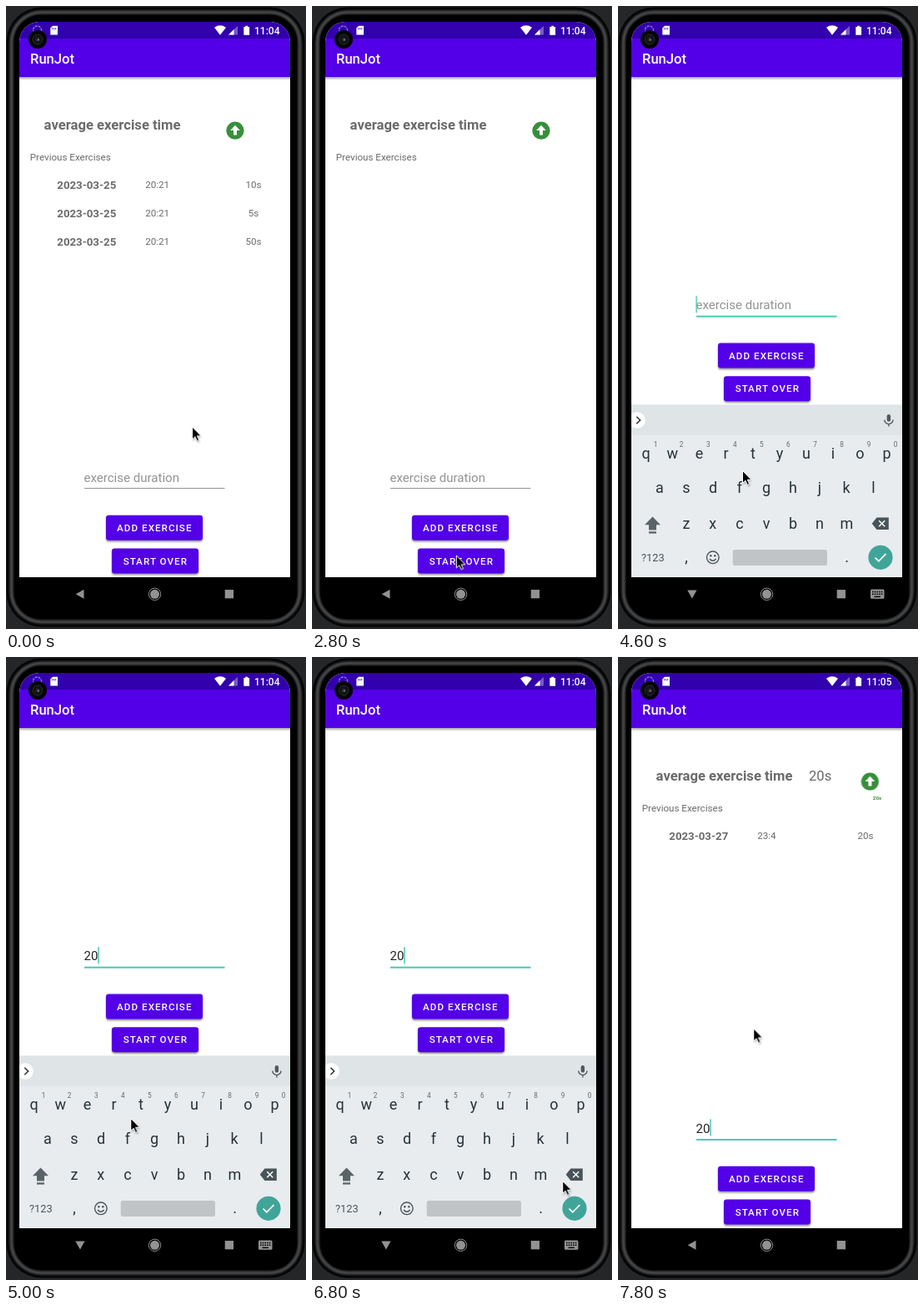
Recreate the animation shown at these times as an HTML page. Size 360x746 px, loop 8000 ms.

```html
<!DOCTYPE html>
<html lang="en">
<head>
<meta charset="utf-8">
<title>RunJot</title>
<style>
html, body { margin: 0; width: 100%; height: 100%; overflow: hidden; background: #242628; }
svg { display: block; width: 360px; height: 746px; }
text { font-family: Roboto, sans-serif; font-size: 11.62px; fill: #6a6a6a; }
.mid { text-anchor: middle; }
.big { font-size: 16.64px; }
.bold { font-weight: 700; }
.date { font-size: 13.23px; font-weight: 700; }
.field { font-size: 15.05px; }
.label { font-weight: 500; fill: #fff; letter-spacing: .0893em; text-anchor: middle; }
.bar { font-weight: 500; fill: #fff; }
.clock { font-size: 12px; }
.typed { fill: #222; }
.key { font-size: 18px; fill: #263238; text-anchor: middle; }
.sup { font-size: 8.2px; fill: #61686c; text-anchor: middle; }

/* one shared clock; every change is a hard step */
.a { animation: 8s step-end -40ms infinite both; }
.cursor { animation-name: cursor; }
.content { animation-name: pan; }
.board { animation-name: board; }
.old { animation-name: old; }
.new { animation-name: new; }
.before { animation-name: before; }
.idle { animation-name: idle; }
.focus { animation-name: focus; }
.hint { animation-name: hint; }
.two { animation-name: two; }
.zero { animation-name: zero; }
.caret { animation-name: blink, caret; }
.back { animation-name: back; }
.down { animation-name: down; }
.badge { animation-name: badge; }
.clear { animation-name: clear; }
.wave { animation-name: wave; }
.flash { animation-name: flash; }
.lift { animation-name: lift; }

@keyframes cursor {
  0% { transform: translate(223px, 503.5px); }
  2.5% { transform: translate(221px, 515px); }
  5% { transform: translate(211px, 551px); }
  7.5% { transform: translate(196px, 597px); }
  10% { transform: translate(184px, 634px); }
  12.5% { transform: translate(176px, 653px); }
  15% { transform: translate(172.8px, 657.5px); }
  37.5% { transform: translate(163px, 609px); }
  40% { transform: translate(149px, 559px); }
  45% { transform: translate(148.2px, 560px); }
  55% { transform: translate(149px, 556px); }
  60% { transform: translate(149.2px, 552px); }
  65% { transform: translate(151px, 543px); }
  67.5% { transform: translate(159px, 506px); }
  70% { transform: translate(172px, 460px); }
  72.5% { transform: translate(182px, 432px); }
  75% { transform: translate(183px, 429.5px); }
  80% { transform: translate(205px, 470px); }
  82.5% { transform: translate(258px, 560px); }
  85% { transform: translate(300.2px, 627px); }
  87.5% { transform: translate(311px, 654px); }
  90%, 92.5% { transform: translate(312px, 657px); }
  95% { transform: translate(238px, 548px); }
  97.5%, 100% { transform: translate(162.2px, 444.5px); }
}
@keyframes pan {
  0% { transform: none; }
  55% { transform: translateY(-206.3px); }
  95%, 100% { transform: none; }
}
@keyframes board {
  0% { transform: translateY(210px); }
  52.5% { transform: translateY(105px); }
  55% { transform: none; }
  92.5% { transform: translateY(120px); }
  95%, 100% { transform: translateY(210px); }
}
@keyframes old { 0% { visibility: visible; } 22.5%, 100% { visibility: hidden; } }
@keyframes new { 0% { visibility: hidden; } 95%, 100% { visibility: visible; } }
@keyframes before { 0% { visibility: visible; } 95%, 100% { visibility: hidden; } }
@keyframes idle { 0% { visibility: visible; } 50%, 100% { visibility: hidden; } }
@keyframes focus { 0% { visibility: hidden; } 50%, 100% { visibility: visible; } }
@keyframes hint { 0% { visibility: visible; } 60%, 100% { visibility: hidden; } }
@keyframes two { 0% { visibility: hidden; } 60%, 100% { visibility: visible; } }
@keyframes zero { 0% { visibility: hidden; } 62.5%, 100% { visibility: visible; } }
@keyframes blink {
  0%, 65%, 77.5%, 90% { visibility: hidden; }
  55%, 72.5%, 85%, 97.5%, 100% { visibility: visible; }
}
@keyframes caret {
  0% { transform: translateX(-16.8px); }
  60% { transform: translateX(-8.4px); }
  62.5%, 100% { transform: none; }
}
@keyframes back { 0%, 92.5%, 100% { visibility: visible; } 52.5% { visibility: hidden; } }
@keyframes down { 0%, 92.5%, 100% { visibility: hidden; } 52.5% { visibility: visible; } }
@keyframes badge { 0% { transform: none; } 95%, 100% { transform: translateX(27.4px); } }
@keyframes clear {
  0% { opacity: 0; }
  22.5% { opacity: .35; }
  25% { opacity: .3; }
  27.5% { opacity: .22; }
  30% { opacity: .13; }
  32.5% { opacity: .05; }
  35%, 100% { opacity: 0; }
}
@keyframes wave { 0%, 77.5%, 100% { opacity: 0; } 75% { opacity: .13; } }
@keyframes flash {
  0% { opacity: 0; }
  75% { opacity: .07; }
  77.5% { opacity: .28; }
  80% { opacity: .14; }
  82.5%, 100% { opacity: 0; }
}
@keyframes lift { 0%, 82.5%, 100% { opacity: 0; } 75% { opacity: .4; } 80% { opacity: .2; } }
</style>
</head>
<body>
<svg viewBox="0 0 360 746" width="360" height="746">
  <defs>
    <clipPath id="screen"><path d="M16 684V43a24 24 0 0 1 24-24H317a24 24 0 0 1 24 24V684z"/></clipPath>
    <clipPath id="page"><path d="M16 85H341V684H16z"/></clipPath>
    <clipPath id="addBox"><rect x="120" y="609.800" width="116" height="30" rx="3.300"/></clipPath>
    <filter id="soft" x="-20%" y="-60%" width="140%" height="220%"><feGaussianBlur stdDeviation="1.300"/></filter>
    <filter id="softer" x="-20%" y="-60%" width="140%" height="220%"><feGaussianBlur stdDeviation="3"/></filter>
    <linearGradient id="drop" x2="0" y2="1">
      <stop stop-color="#000" stop-opacity=".35"/><stop offset="1" stop-color="#000" stop-opacity="0"/>
    </linearGradient>
  </defs>

  <!-- phone body -->
  <rect width="360" height="746" fill="#242628"/>
  <rect x=".5" y="1.500" width="358" height="742" rx="42" fill="#050505"/>
  <rect x="6.500" y="7.500" width="346" height="730" rx="36" fill="none" stroke="#4a4c4d" stroke-width="4" filter="url(#soft)"/>
  <rect x="10" y="11" width="339" height="723" rx="32" fill="#000"/>

  <g clip-path="url(#screen)">
    <path d="M16 19H341V684H16z" fill="#fff"/>

    <g clip-path="url(#page)">
      <g class="a content">
        <text class="big bold" x="45.600" y="148.300">average exercise time</text>
        <text x="28.800" y="185.300">Previous Exercises</text>
        <g class="a badge">
          <circle cx="275" cy="149.200" r="10.600" fill="#388f3b"/>
          <path d="M275 142.700l5.800 6.200h-3.800v5.600h-4v-5.600h-3.800z" fill="#fff"/>
        </g>

        <g class="a old">
          <text class="date" x="61.300" y="219.300">2023-03-25</text>
          <text x="167.200" y="218.200">20:21</text>
          <text class="mid" x="297" y="218.200">10s</text>
          <text class="date" x="61.300" y="253.300">2023-03-25</text>
          <text x="167.200" y="252.200">20:21</text>
          <text class="mid" x="297" y="252.200">5s</text>
          <text class="date" x="61.300" y="287.300">2023-03-25</text>
          <text x="167.200" y="286.200">20:21</text>
          <text class="mid" x="297" y="286.200">50s</text>
        </g>
        <g class="a new">
          <text class="big" x="229" y="148.300">20s</text>
          <text class="bold mid" x="311" y="171" style="font-size:6.200px;fill:#388f3b">20s</text>
          <text class="date" x="61.300" y="219.300">2023-03-27</text>
          <text x="167.200" y="218.200">23:4</text>
          <text class="mid" x="297" y="218.200">20s</text>
        </g>

        <text class="field a hint" x="93.500" y="569.500" style="fill:#929292">exercise duration</text>
        <text class="field typed a two" x="93.500" y="569.800">2</text>
        <text class="field typed a zero" x="101.900" y="569.800">0</text>
        <path class="a caret" d="M111 553.500V573.500" stroke="#4fc4b5" stroke-width="1.500"/>
        <path class="a idle" d="M94 577.500H262.500" stroke="#929292"/>
        <path class="a focus" d="M94 578.100H262.500" stroke="#4fc8b7" stroke-width="2"/>

        <rect x="120" y="611.500" width="116" height="30" rx="3.300" opacity=".45" filter="url(#soft)"/>
        <rect class="a lift" x="120" y="616" width="116" height="30" rx="3.300" filter="url(#softer)"/>
        <g clip-path="url(#addBox)">
          <path d="M120 609H236V641H120z" fill="#5300e9"/>
          <path class="a flash" d="M120 609H236V641H120z" fill="#fff"/>
          <circle class="a wave" cx="168" cy="625" r="47" fill="#fff"/>
        </g>
        <text class="label" x="178.300" y="629">ADD EXERCISE</text>

        <rect x="127" y="651.200" width="104" height="30" rx="3.300" opacity=".45" filter="url(#soft)"/>
        <rect x="127" y="649.500" width="104" height="30" rx="3.300" fill="#5300e9"/>
        <g class="a clear" fill="#fff">
          <rect x="127" y="649.500" width="104" height="30" rx="3.300" fill-opacity=".45"/>
          <rect x="129" y="651.500" width="100" height="26" rx="2"/>
        </g>
        <text class="label" x="179.300" y="668.700">START OVER</text>
      </g>
    </g>

    <!-- app bar and status bar -->
    <path d="M16 85H341V89H16z" fill="url(#drop)"/>
    <path d="M16 39H341V85H16z" fill="#5300e9"/>
    <path d="M16 19H341V39H16z" fill="#3200ad"/>
    <text class="bar big" x="29" y="69">RunJot</text>
    <circle cx="37.500" cy="29" r="5" fill="none" stroke="#8c75d0" stroke-width="1.400" stroke-dasharray="3 1"/>
    <path d="M56 23.800h6v10.700h-8.700v-8z" fill="#fff"/>
    <path d="M55.700 26v2.400M57.700 26v2.400M59.700 26v2.400" stroke="#3200ad" stroke-width=".8"/>
    <path d="M250 25.700q7-4.800 14 0L257 34.700z" fill="#fff"/>
    <path d="M278 23.700V34.500H267z" fill="#fff" opacity=".35"/>
    <path d="M273.500 28V34.500H267z" fill="#fff"/>
    <path d="M285.300 25h1.900v-1.300h3v1.300h1.900v9.700h-6.800z" fill="#fff"/>
    <text class="bar clock a before" x="298" y="33.600">11:04</text>
    <text class="bar clock a new" x="298" y="33.600">11:05</text>

    <!-- keyboard -->
    <g class="a board">
      <path d="M16 477.500H341V684H16z" fill="#e8ecef"/>
      <path d="M16 477.500H341V513.500H16z" fill="#dfe4e6"/>
      <circle cx="23" cy="496" r="9.800" fill="#fff"/>
      <path d="M22.300 491.800l4.300 4.200-4.300 4.200" fill="none" stroke="#333" stroke-width="1.600"/>
      <rect x="322.700" y="489" width="4.400" height="8.600" rx="2.200" fill="#51595e"/>
      <path d="M319.800 495.500a5.100 5.100 0 0 0 10.200 0M324.900 500.600v2.900" fill="none" stroke="#51595e" stroke-width="1.400"/>

      <text class="key" y="542" x="33.700 65.300 97.500 129.500 162 194 226 258 290.500 322.500">qwertyuiop</text>
      <text class="sup" y="528" x="45 76 108.300 140.300 172.300 204.300 236.500 268.500 301 333">1234567890</text>
      <text class="key" y="583" x="49.800 82 114 146 178 210 242 274 306.500">asdfghjkl</text>
      <text class="key" y="625.500" x="82 113.800 146 178 210 242 274.500">zxcvbnm</text>
      <path d="M41.500 611.500l9.500 9.800h-5v6.200h-9v-6.200h-5z" fill="#5a6468"/>
      <path d="M37 629.300h9v2.300h-9z" fill="#5a6468"/>
      <path d="M304.700 619.800l5.800-7.300h14.300v14.600h-14.300z" fill="#49545a"/>
      <path d="M313.200 616.300l7 7m0-7l-7 7" stroke="#fff" stroke-width="1.500"/>

      <text x="28" y="664.800" style="font-size:12.800px;fill:#4a5458">?123</text>
      <text class="key" y="665.500" x="82 274.500">,.</text>
      <g fill="none" stroke="#4a5458" stroke-width="1.400">
        <circle cx="113.800" cy="660.300" r="7.300"/>
        <path d="M110 662q3.800 4.600 7.600 0"/>
      </g>
      <circle cx="111.300" cy="658.300" r="1.200" fill="#4a5458"/>
      <circle cx="116.300" cy="658.300" r="1.200" fill="#4a5458"/>
      <rect x="137.700" y="651" width="113.300" height="19" rx="2.500" fill="#c1c4c6"/>
      <circle cx="315" cy="660.300" r="14.600" fill="#40a598"/>
      <path d="M308.500 660.500l4.300 4.400 8.600-8.800" fill="none" stroke="#fff" stroke-width="1.700"/>
    </g>
  </g>

  <!-- navigation bar -->
  <g fill="#929292">
    <path class="a back" d="M93.500 698.800V709.700L83.700 704.200z"/>
    <path class="a down" d="M83.300 699.500H94.500L88.900 709.500z"/>
    <circle cx="178.500" cy="704.300" r="5.500"/>
    <circle cx="178.500" cy="704.300" r="7.200" fill="none" stroke="#929292"/>
    <path d="M262.700 699h10.300v10.300h-10.300z"/>
    <g class="a down">
      <rect x="303" y="698.500" width="16.500" height="11.200" rx="1.500"/>
      <path d="M305 701.500h12.600M305 704.300h12.600" stroke="#000" stroke-width="1.500" stroke-dasharray="1.600 1.100"/>
      <path d="M307.500 707.300h7.500" stroke="#000" stroke-width="1.300"/>
    </g>
  </g>

  <!-- camera -->
  <circle cx="38" cy="40" r="11" fill="#050505"/>
  <circle cx="38" cy="40" r="6" fill="#111214" stroke="#2b2c2f"/>
  <circle cx="38" cy="40" r="2.600" fill="#24262c"/>
  <circle cx="38.800" cy="40.500" r="1" fill="#85878c"/>

  <g class="a cursor">
    <path d="M1 2V17.500L4.600 14.300 7 19.500 9.800 18.300 7.400 13.100H12z" opacity=".3" filter="url(#soft)"/>
    <path d="M.5 .5V15.300L3.900 12.200 6.300 17.400 8.700 16.300 6.300 11.300H11z" fill="#000" stroke="#fff"/>
  </g>
</svg>
</body>
</html>
```
